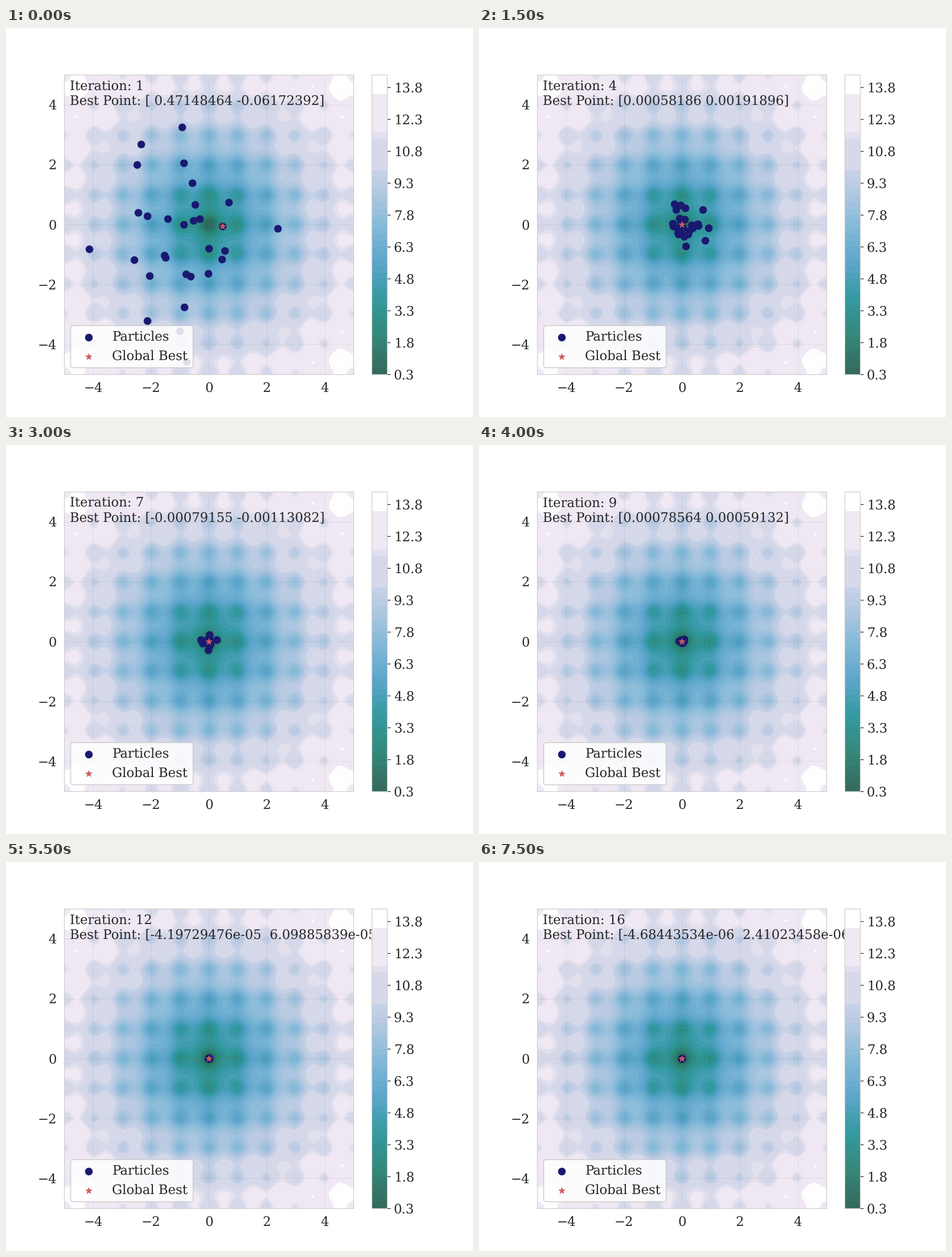
Animation of 820x683 px, one loop 8 s. Source, as a matplotlib script:

```python
import numpy as np
import matplotlib.pyplot as plt
from matplotlib.animation import FuncAnimation

WIDTH, HEIGHT, STEPS, STEP_MS = 820, 683, 16, 500
DPI = WIDTH / 12
PARTICLES = 30
GRAY, INK = "0.8", "0.15"

plt.rcParams.update({
    "font.family": "DejaVu Serif", "font.size": 24, "text.color": INK,
    "text.hinting": "none", "axes.edgecolor": GRAY, "axes.linewidth": 1.25,
    "xtick.color": INK, "ytick.color": INK,
    "figure.subplot.left": .1245, "figure.subplot.right": .8995,
})

# Iteration at which each best point was found
BEST = {1: "[ 0.47148464 -0.06172392]", 2: "[-0.02245829 -0.04158115]",
        4: "[0.00058186 0.00191896]", 7: "[-0.00079155 -0.00113082]",
        9: "[0.00078564 0.00059132]", 10: "[ 1.73519462e-04 -3.60842175e-05]",
        12: "[-4.19729476e-05  6.09885839e-05]",
        14: "[-1.52048367e-05  2.87716093e-05]",
        15: "[ 9.16473528e-06 -7.30562814e-06]",
        16: "[-4.68443534e-06  2.41023458e-06]"}


def ackley(x, y):
    bowl = -20 * np.exp(-.2 * np.sqrt((x * x + y * y) / 2))
    waves = -np.exp((np.cos(2 * np.pi * x) + np.cos(2 * np.pi * y)) / 2)
    return bowl + waves + 20 + np.e


def swarm(it, best):
    """Cloud that shrinks and drifts to the origin, plus the best particle."""
    rng = np.random.default_rng(it)
    spread = 1.8 * .6 ** (it - 1)
    center = np.array([-.9, -.9]) * .35 ** (it - 1)
    pts = center + rng.laplace(0, spread / np.sqrt(2), (PARTICLES - 1, 2))
    return np.vstack([np.clip(pts, -5, 5), best])


def layer_colors(n):
    """Colour map at 80 % over white, with flat steps at the pale end."""
    rgb = .2 + .8 * cmap(np.linspace(0, 1, n))[:, :3]
    for a, b in ((32, 37), (38, 44)):
        rgb[a:b] = rgb[a:b].mean(axis=0)
    rgb[44:] = 1
    return rgb


fig, ax = plt.subplots(figsize=((WIDTH + .01) / DPI, (HEIGHT + .01) / DPI), dpi=DPI)
fig.patch.set_facecolor("white")

cmap = plt.get_cmap("PuBuGn_r")
x, y = np.meshgrid(np.linspace(-5, 5, 100), np.linspace(-5, 5, 100))
z = ackley(x, y)
levels = np.arange(1, 49) * .3
field = ax.contourf(x, y, z, levels=levels, colors=layer_colors(len(levels) - 1))
ax.contour(x, y, z, levels=levels, colors=cmap(np.linspace(0, 1, len(levels))),
           linewidths=.6, alpha=.6)

bar = fig.colorbar(field, ax=ax, ticks=levels[::5], format="%.1f")
bar.ax.tick_params(length=6, width=1.25, pad=7)

ax.set(xlim=(-5, 5), ylim=(-5, 5), xticks=range(-4, 5, 2), yticks=range(-4, 5, 2))
ax.set_axisbelow("line")
ax.grid(True, color="0.4", alpha=.12, linewidth=1)
ax.tick_params(length=0, pad=14)

dots = ax.scatter([], [], s=175, color="midnightblue", label="Particles", zorder=2)
star = ax.scatter([], [], s=140, marker="*", color="indianred",
                  label="Global Best", zorder=2)
note = ax.text(.02, .9815, "", transform=ax.transAxes, va="top")
legend = ax.legend(loc="lower left", framealpha=.87, edgecolor="0.77")
legend.get_frame().set_linewidth(1.5)


def update(i):
    it = i + 1
    text = BEST[max(k for k in BEST if k <= it)]
    best = [float(v) for v in text.strip("[]").split()]
    dots.set_offsets(swarm(it, best))
    star.set_offsets([best])
    note.set_text(f"Iteration: {it}\nBest Point: {text}")
    return dots, star, note


anim = FuncAnimation(fig, update, frames=STEPS, interval=STEP_MS,
                     repeat=True, repeat_delay=0, blit=False)
plt.show()
```
